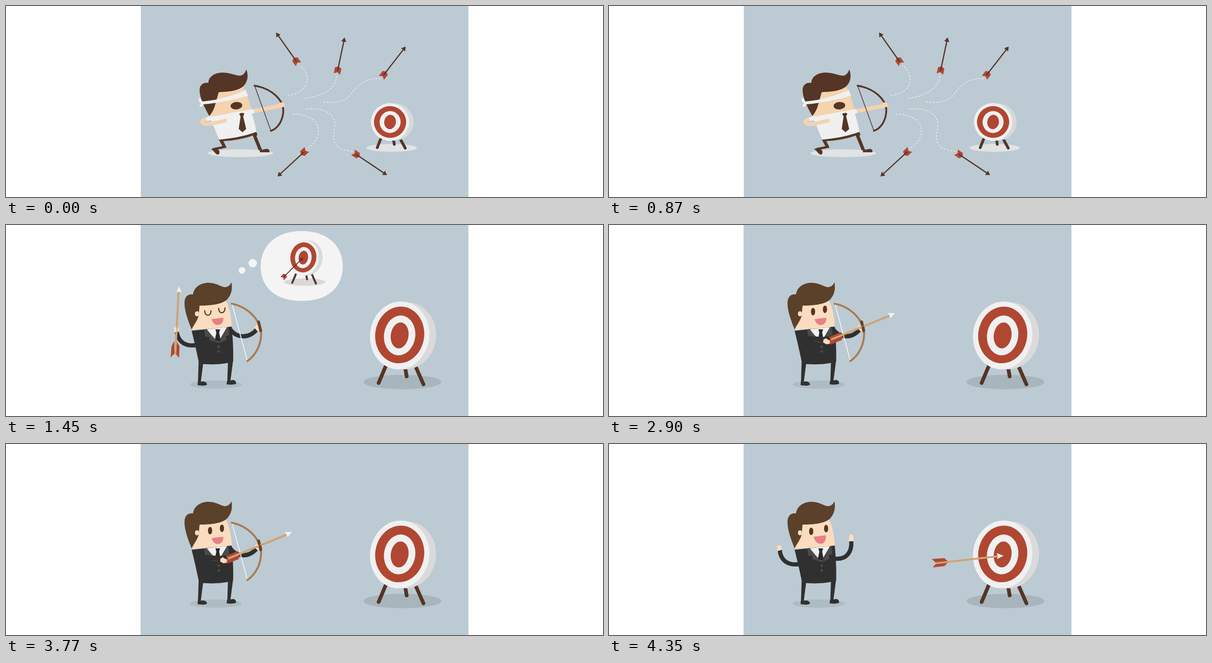
Animation, 1280 px wide and 410 px high, one loop 5.8 s. Source, as an HTML page:

```html
<!DOCTYPE html>
<html lang="en">
<head>
<meta charset="utf-8">
<title>Archer and target</title>
<style>
  html, body { margin: 0; width: 100%; height: 100%; overflow: hidden; background: #fff; }
  svg { display: block; width: 1280px; height: 410px; }
  .line { fill: none; stroke-linecap: round; stroke-linejoin: round; }
  .sky { fill: #bccad3; }
  .brown { fill: #553525; }
  .wood { stroke: #553525; }
  .red { fill: #b04732; }
  .white { fill: #f0f0f1; }
  .skin { fill: #fbdcbf; }
  .tan { fill: #f5d3ae; }
  .suit { fill: #303030; }
  .sleeve { stroke: #303030; stroke-width: 9; stroke-linecap: butt; }
  .lapel { fill: #4b4b4b; }
  .hair { fill: #5b402a; }
  .shaft { stroke: #d0a273; stroke-width: 4.2; stroke-linecap: butt; }
  .trail { stroke: #f0f4f5; stroke-width: 1.4; stroke-dasharray: 4 3.2; stroke-linecap: butt; }
  [data-on] { opacity: 0; }
</style>
</head>
<body>
<svg viewBox="0 0 1280 410">
  <defs>
    <g id="target">
      <path class="line wood" stroke-width="8" d="M-29 64L-45 102M12 70L15 88M33 64L51 105"/>
      <ellipse cx="14" cy="1" rx="64" ry="72" fill="#dadada" transform="rotate(8 14 1)"/>
      <g transform="rotate(8)">
        <ellipse class="white" rx="63.500" ry="73"/>
        <ellipse class="red" cy="-1" rx="52.500" ry="61"/>
        <ellipse class="white" rx="33.500" ry="43"/>
        <ellipse class="red" rx="19" ry="28"/>
      </g>
    </g>
    <g id="bow">
      <path class="line" stroke="#eef0f1" stroke-width="2" d="M485 171L517 290"/>
      <path class="line" stroke="#aa7b4e" stroke-width="4.200" d="M484 169C519 176 546 204 547 233C547 258 535 280 517.500 292"/>
    </g>
    <path id="bowArm" class="line sleeve" d="M480 223C494 243 520 245 538 224"/>
    <g id="grip">
      <path class="skin" d="M532 220L539 213L548 221L546 229L539 228Z"/>
      <path class="line" stroke="#684329" stroke-width="6" stroke-linecap="butt" d="M541.500 208L546 227"/>
    </g>
  </defs>

  <!-- blindfolded archer -->
  <g data-on="1000">
    <path class="sky" d="M289 0H991.500V410H289Z"/>
    <ellipse cx="502.500" cy="316" rx="70" ry="8.500" fill="#e1e3e4"/>
    <ellipse cx="827" cy="304.500" rx="54" ry="8.500" fill="#e1e3e4"/>
    <path class="line wood" stroke-width="6" d="M803 286L796 304M831 288L832.500 297M845 285L856 305"/>
    <ellipse cx="833" cy="249" rx="41" ry="40" fill="#d7d9d9"/>
    <g transform="translate(823.500 249) rotate(8)">
      <ellipse class="white" rx="41" ry="40.500"/>
      <ellipse class="red" rx="34.500" ry="34"/>
      <ellipse class="white" rx="22.500" ry="23.500"/>
      <ellipse class="red" rx="12.500" ry="15.500"/>
    </g>

    <path class="brown" d="M456 286L536 269L539 276L537 279L549 309L542 310L529 278C510 285 488 289 466 290L473 304L449 309L444 305L464 301L457 288Z"/>
    <path class="brown" d="M440 307C445 304 449 307 456 309C459 313 458 318 455 319C449 319 446 311 440 307Z"/>
    <path class="brown" d="M544 314L545 308C551 310 556 306 561 307C565 308 566 312 564 314Z"/>
    <path class="tan" d="M450 184L509 174C517 190 523 207 526 222L437 238Z"/>
    <path class="white" d="M437 238L524 222C530 238 534 254 537 270C511 280 484 284 457 287C450 270 443 253 437 238Z"/>
    <path class="brown" d="M436 236C424 215 413 192 415.500 176C418 166 427 164 434 165C434 152 447 143 464 143C484 143 496 152 505 149C511 146 514 141 515 136C521 149 518 167 505 175C493 183 474 184 456 185L447 217C444 225 440 232 436 236Z"/>
    <path class="white" d="M421 205C454 202 487 193 514 180L519 193C489 200 455 209 423 211C423 214 420 216 416 217C414 213 416 211 418 209C414 207 412 202 414 197C417 198 419 201 421 205Z"/>
    <ellipse class="brown" cx="494" cy="214" rx="12.500" ry="8" transform="rotate(-5 494 214)"/>
    <path class="brown" d="M500 232C503 229 508 229 511 231L508.500 237L515 264L507 271L499 264L503 237Z"/>
    <path class="line" stroke="#f5d3ae" stroke-width="8" d="M432 243C417 244 417 253 430 253.500C445 253 457 249 470 246"/>
    <path class="white" d="M428 240L440 235L441 245L432 247Z"/>
    <path class="tan" d="M528 222L586 210C588 206 595 206 597 209L598 216L588 219L530 230Z"/>
    <path class="white" d="M521 223L530 221L533 229L524 233Z"/>
    <path class="line wood" stroke-width="1.500" d="M533 171L568 268"/>
    <path class="line wood" stroke-width="3.800" d="M533 171C570 177 593 201 594.500 222C595 245 583 263 568 268"/>
    <path class="tan" d="M584 210C588 206 595 206 597 209L598 216L590 218Z"/>

    <path class="line trail" d="M604 192C630 189 647 175 646 155C645 143 637 133 629 127"/>
    <path class="line trail" d="M641 198C685 193 710 172 709 148"/>
    <path class="line trail" d="M680 206C715 209 730 204 742 186C757 165 775 154 806 156"/>
    <path class="line trail" d="M615 232C645 232 668 244 670 265C670 285 660 297 647 305"/>
    <path class="line trail" d="M644 221C680 218 706 230 705 257C703 275 700 288 707 298C716 309 732 311 743 312"/>
    <g id="strays"></g>
  </g>

  <!-- stage, target and man in a suit -->
  <g data-on="0111">
    <path class="sky" d="M288.500 0H991.500V410H288.500Z"/>
    <ellipse cx="850" cy="337" rx="83.500" ry="15.500" fill="#a8b5bc"/>
    <use href="#target" transform="translate(844 237)"/>
    <ellipse cx="450" cy="342.500" rx="56" ry="9" fill="#aebbc3"/>
    <path class="suit" d="M413 294L423 295L417.500 338L411.500 339ZM476 291L487 290L481 336L474.500 337Z"/>
    <path class="suit" d="M411 344V337C415 339 419 335 424 336C429 337 431 340 431 343L424 345ZM473 342L474 334C479 336 484 332 489 333C493 335 494 338 493 341C488 343 480 343 473 342Z"/>
  </g>

  <path data-on="0101" class="line sleeve" d="M406 258C385 261 368 251 366 227"/>
  <use data-on="0110" href="#bowArm"/>
  <path data-on="0001" class="line sleeve" d="M484 246C509 249 521 232 519.500 209"/>

  <g data-on="0111">
    <path class="skin" d="M412 170L471 161C480 178 483 198 484 219L399 225Z"/>
    <path class="hair" d="M398 224C390 205 381 180 383 163C385 151 393 148 401 149C403 133 418 124 434 124C452 124 462 134 470 133.500C477 133 481 128 483.500 123C486 138 483 150 474 160C462 171 437 173 415 173L413 195C410 206 403 214 398 224Z"/>
    <ellipse class="skin" cx="409.500" cy="190.500" rx="4.500" ry="5.500"/>
    <path class="suit" d="M398 227L484 218C486 240 488 270 487 293C465 300 440 300 414 298C409 272 403 247 398 227Z"/>
    <path class="white" d="M429 224L474 219L455 252Z"/>
    <path class="lapel" d="M425 225L430 223L454 253L436 247L437 241L427 239ZM474 220L477 220L479 236L471 239L473 246L456 254Z"/>
    <path fill="#292929" d="M449 224H459L457 231L460 246L455 251L448 246L451 231Z"/>
    <circle class="lapel" cx="456" cy="261" r="2.700"/>
    <circle class="lapel" cx="456" cy="271.500" r="2.700"/>
  </g>

  <path data-on="0110" fill="#ea7e86" d="M441 202L466 199C467 219 444 220 441 202Z"/>
  <path data-on="0001" fill="#ea7e86" d="M439 199L465 196C467 220 443 220 439 199Z"/>
  <path data-on="0100" class="line" stroke="#553b28" stroke-width="2.400" d="M426 184C426 197 440 197 439.500 184M456 179C456 192 470 191 469.500 178"/>
  <g data-on="0010" class="brown">
    <ellipse cx="437.500" cy="186" rx="4.500" ry="8"/>
    <ellipse cx="463" cy="181" rx="4.500" ry="8"/>
  </g>
  <g data-on="0001" class="brown">
    <ellipse cx="433.500" cy="187.500" rx="4.500" ry="8"/>
    <ellipse cx="465.500" cy="181.500" rx="4.500" ry="8"/>
  </g>

  <g data-on="0110">
    <use href="#bow"/>
    <use href="#grip"/>
  </g>

  <!-- imagining the shot -->
  <g data-on="0100">
    <path class="skin" d="M360 222C361 217 367 217 370 220L371 229L362 231Z"/>
    <path class="red" d="M361 249V276L353 284L355 260ZM365 249L372 260L371 285L363 276L361 276Z"/>
    <path class="line shaft" d="M370 143L363 278"/>
    <path class="white" d="M371 131L377 145L371 143L365 145Z"/>
    <path class="skin" d="M360 222L365 219L366 228L361 230Z"/>
    <path fill="#f4f4f5" d="M634 13C690 13 722 45 722 89C722 134 690 163 634 163C578 163 546 134 546 89C546 45 578 13 634 13Z"/>
    <circle cx="506" cy="97.500" r="7" fill="#f4f4f5"/>
    <circle cx="529" cy="82" r="9" fill="#f4f4f5"/>
    <ellipse cx="640.500" cy="122.500" rx="44.500" ry="8" fill="#d9d9da"/>
    <use href="#target" transform="translate(637.500 70) scale(.53)"/>
    <g id="thought"></g>
  </g>

  <!-- drawing the bow -->
  <g data-on="0010">
    <path class="red" d="M472 240L497 230L501.500 236L499 247L474 257L470 249Z"/>
    <path class="line shaft" d="M476 246L602 194.500"/>
    <path class="white" d="M613 189L597 189L601 194L604 200Z"/>
    <path class="line" stroke="#684329" stroke-width="6" stroke-linecap="butt" d="M541.500 208L543 214M545 220L546 227"/>
    <path class="suit" d="M428 238L463 241L461 252L436 256Z"/>
    <path class="line" stroke="#4b4b4b" stroke-width="1.500" d="M440 250C447 249 451 251 455 253"/>
    <path class="skin" d="M460 245L467 242L474 248L473 255L466 256L459 252Z"/>
    <path class="suit" d="M460 240L471 239L475 248L469 246L465 243L460 246Z"/>
  </g>

  <!-- bullseye -->
  <g data-on="0001">
    <path class="skin" d="M360 221C361 216 368 216 370 220L371 227L361 230Z"/>
    <path class="skin" d="M515 198C515 193 524 192 524 198L525 208L514 208Z"/>
    <path class="red" d="M692 247L719 245L728 253L719 262L694 265L702 256Z"/>
    <path class="line shaft" d="M701 256L834 241"/>
    <path class="white" d="M846 240L831 234L834 241L832 247Z"/>
  </g>
</svg>
<script>
  const STEP = 1450, SCENES = 4;

  // An arrow from tail to tip; k scales its head and feathers.
  function arrow(x1, y1, x2, y2, k = 1) {
    const len = Math.hypot(x2 - x1, y2 - y1) / k;
    const turn = Math.atan2(y2 - y1, x2 - x1) * 180 / Math.PI;
    return `<g transform="translate(${x1} ${y1}) rotate(${turn}) scale(${k})">
      <path class="red" d="M0-7H13L17 0L13 7H0L4 0Z"/>
      <path class="line wood" stroke-width="2.600" d="M8 0H${len - 5}"/>
      <path class="brown" d="M${len} 0l-9-5.500v11z"/></g>`;
  }

  const strays = [
    [627, 125, 579, 57], [709.5, 146, 726, 67.5], [805, 154, 857, 87],
    [645, 308, 582, 366], [744, 314, 817, 363]
  ];
  document.getElementById('strays').innerHTML = strays.map(a => arrow(...a)).join('');
  document.getElementById('thought').innerHTML = arrow(592, 115, 637, 70, .72);

  // Each digit of data-on says whether the part shows in that scene.
  for (const part of document.querySelectorAll('[data-on]')) {
    const on = part.dataset.on;
    const frames = [...on, on[0]].map((opacity, i) =>
      ({ opacity, offset: i / SCENES, easing: 'steps(1, end)' }));
    part.animate(frames, { duration: STEP * SCENES, iterations: Infinity }).startTime = 0;
  }
</script>
</body>
</html>
```
